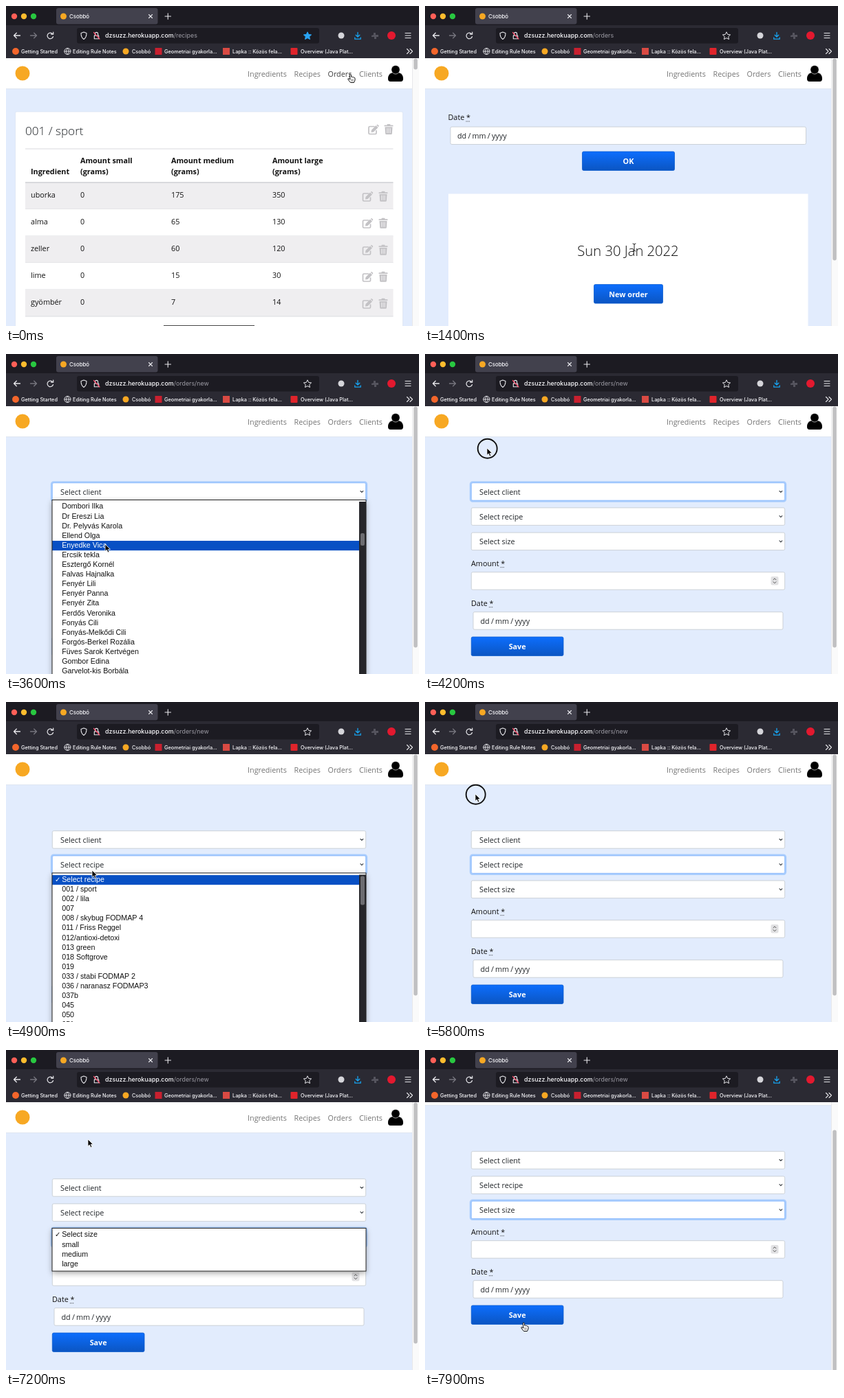
An HTML page that plays this animation: 600x466 px, repeating every 8 s.

```html
<!DOCTYPE html>
<html lang="hu">
<head>
<meta charset="utf-8">
<title>Orders</title>
<style>
  html, body { margin: 0; width: 100%; height: 100%; overflow: hidden; background: #e2ecfd; }
  svg { display: block; }
  #stage { width: 100vw; height: 100vh; }
  text { font-family: "Open Sans", sans-serif; white-space: pre; }
  .ui { font-family: Inter, sans-serif; font-weight: 500; }
  .list { font-family: "Liberation Sans", "DejaVu Sans", sans-serif; }
  .mid { text-anchor: middle; }
  .bold { font-weight: 700; }
  .light { font-weight: 300; }
</style>
</head>
<body>
<svg id="stage" viewBox="0 0 600 466" preserveAspectRatio="none">
  <defs>
    <linearGradient id="blue" x2="0" y2="1">
      <stop stop-color="#0d6efd"/><stop offset="1" stop-color="#0b55c2"/>
    </linearGradient>
    <filter id="shadow" x="-10%" y="-20%" width="120%" height="150%">
      <feDropShadow dx="0" dy="3" stdDeviation="4" flood-opacity=".35"/>
    </filter>
  </defs>
  <g id="page"></g>
  <g id="chrome"></g>
  <g id="over"></g>
</svg>
<script>
const LOOP = 8000, STEP = 100, ROW = 14.1;
const $ = id => document.getElementById(id);

// Drawing helpers, each returning SVG markup
const rect = (x, y, w, h, fill, more = '') =>
  `<rect x="${x}" y="${y}" width="${w}" height="${h}" fill="${fill}" ${more}/>`;
const text = (x, y, s, size = 10.8, fill = '#212529', cls = '') =>
  `<text x="${x}" y="${y}" font-size="${size}" fill="${fill}" class="${cls}">${s}</text>`;
const dot = (x, y, r, fill, more = '') =>
  `<circle cx="${x}" cy="${y}" r="${r}" fill="${fill}" ${more}/>`;
const line = (d, stroke, w = 1.1, more = '') =>
  `<path d="${d}" fill="none" stroke="${stroke}" stroke-width="${w}" stroke-linecap="round" stroke-linejoin="round" ${more}/>`;
const at = (x, y, s) => `<g transform="translate(${x} ${y})">${s}</g>`;

const pencil = (x, y) => at(x, y,
  line('M9 3H2.5Q1 3 1 4.5V12.5Q1 14 2.5 14H10.5Q12 14 12 12.5V9', '#c3c2c5', 1.7) +
  '<path d="M5 8L11.5 1.5L14.5 4.5L8 11L4.5 11.5ZM12.3 .8L13 .2Q13.7-.2 14.3 .4L15.5 1.6Q16 2.3 15.4 3L14.9 3.7Z" fill="#c3c2c5"/>');
const trash = (x, y) => at(x, y,
  rect(0, 1.5, 13, 1.8, '#c3c2c5', 'rx=".6"') + rect(4, 0, 5, 2, '#c3c2c5', 'rx=".8"') +
  '<path d="M1 4.3H12L11.3 14Q11.2 15 10 15H3Q1.8 15 1.7 14Z" fill="#c3c2c5"/>' +
  line('M4.2 6.3V12.7M6.5 6.3V12.7M8.8 6.3V12.7', '#f2f1f3', 1));

const field = (x, y, w, focus) =>
  (focus ? rect(x - 1.2, y - 1.2, w + 2.4, 27.9, 'none', 'rx="3" stroke="#a9cdfd" stroke-width="2.6"') : '') +
  rect(x, y, w, 25.5, '#fff', `rx="2" stroke="${focus ? '#86b7fe' : '#c8cdd3'}" stroke-width=".9"`);
const select = (y, label, focus) => field(67.3, y, 455.4, focus) +
  text(79, y + 17, label) + line(`M515 ${y + 11.8}l1.9 1.9l1.9-1.9`, '#343a40');
const button = (x, y, w, label) =>
  rect(x, y, w, 27.5, 'url(#blue)', 'rx="2" stroke="#0b5ccf" stroke-width=".8"') +
  text(x + w / 2, y + 18, label, 10.8, '#fff', 'bold mid');
const label = (x, y, s, star) => text(x, y, s + ' *', 10.8, '#111') +
  line(`M${star} ${y + 2}h6`, '#222', 1, 'stroke-dasharray=".1 2"');
const DATE = 'dd\u2009/\u2009mm\u2009/\u2009yyyy';

function header(hover) {
  const links = [[351, 'Ingredients'], [418.5, 'Recipes'], [467.5, 'Orders'], [513, 'Clients']];
  return rect(0, 76, 600, 44.5, '#fff') + rect(0, 120.3, 600, .8, '#dce3ee') +
    dot(24, 98, 10.5, '#f7a823') +
    links.map(([x, s]) => text(x, 102.7, s, 10.8, hover === s ? '#3c3c3c' : '#747474')).join('') +
    '<path d="M555 106Q555 98.5 561.5 97H570.5Q577 98.5 577 106Q577 110 573.5 110H558.5Q555 110 555 106Z"/>' +
    '<ellipse cx="566" cy="92.8" rx="6.2" ry="6.3" stroke="#fff" stroke-width=".6"/>';
}

const AMOUNTS = [['uborka', 175, 350], ['alma', 65, 130], ['zeller', 60, 120], ['lime', 15, 30], ['gyömbér', 7, 14]];
function recipesPage(t) {
  const cols = [36, 108, 240, 387];
  let s = header(t < 1000 ? 'Orders' : '') +
    rect(13.5, 154, 563, 330, '#fff', 'rx="2" stroke="#d9e2f1" stroke-width=".7"') +
    text(28, 188, '001 / sport', 17.1, '#212529', 'light') + pencil(526, 172.5) + trash(549.5, 172) +
    rect(28, 207.5, 534.5, 1, '#d9dade') + text(36, 244.7, 'Ingredient', 10.8, '#111', 'bold');
  ['small', 'medium', 'large'].forEach((size, i) => {
    s += text(cols[i + 1], 229.2, 'Amount ' + size, 10.8, '#111', 'bold') +
      text(cols[i + 1], 244.7, '(grams)', 10.8, '#111', 'bold');
  });
  AMOUNTS.forEach(([name, medium, large], i) => {
    const y = 257 + i * 39;
    s += rect(28, y, 534.5, 39, i % 2 ? '#fff' : '#efeef0') + rect(28, y + 38.5, 534.5, 1, '#dcdde1') +
      [name, 0, medium, large].map((v, k) => text(cols[k], y + 21.7, v, 10.8, '#111')).join('') +
      pencil(517.5, y + 13) + trash(541.5, y + 12.7);
  });
  return s + rect(28, 256.3, 534.5, 1.4, '#ccced2') + rect(229, 465, 132, 1, '#444');
}

function ordersPage() {
  return header() + label(33.5, 166, 'Date', 60) + field(37, 176, 516.5) + text(47, 192.5, DATE) +
    button(228.5, 212, 134, 'OK') + rect(34, 273.5, 522.5, 200, '#fff') +
    text(295, 364, 'Sun 30 Jan 2022', 20.2, '#111', 'light mid') +
    button(245.5, 405.5, 100, 'New order');
}

function formPage(t) {
  const focus = t < 2800 ? -1 : t < 4600 ? 0 : t < 6500 ? 1 : 2;
  return header() +
    ['client', 'recipe', 'size'].map((s, i) => select(187.7 + i * 36.2, 'Select ' + s, focus === i)).join('') +
    label(67, 308.7, 'Amount', 110) + field(67.3, 317.7, 455.4) +
    rect(502.5, 324, 11, 12.5, '#e1e1e3', 'rx="2"') +
    line('M506 328.8l2-2l2 2M506 331.8l2 2l2-2', '#555', 1) +
    label(67, 366.7, 'Date', 93.5) + field(70, 375.7, 450) + text(80.5, 392.5, DATE) +
    button(67.3, 412, 133.7, 'Save');
}

// Drop-down contents
const FAMILY = 'Abonka,Almosi,Bazsik,Berkő,Bodzás,Borsos,Csenger,Cserfás,Dalmos'.split(',');
const GIVEN = 'Anna,Cili,Emese,Lenke,Tekla'.split(',');
const CLIENTS = ['Select client',
  ...Array.from({ length: 43 }, (_, i) => FAMILY[Math.floor(i / 5)] + ' ' + GIVEN[i % 5]),
  ...('Dombori Ilka,Dr Ereszi Lia,Dr. Pelyvás Karola,Ellend Olga,Enyedke Vica,Ercsik tekla,Esztergő Kornél,' +
  'Falvas Hajnalka,Fenyér Lili,Fenyér Panna,Fenyér Zita,Ferdős Veronika,Fonyás Cili,Fonyás-Melkődi Cili,' +
  'Forgós-Berkel Rozália,Füves Sarok Kertvégen,Gombor Edina,Garvelot-kis Borbála').split(',')];
const RECIPES = ('Select recipe,001 / sport,002 / lila,007,008 / skybug FODMAP 4,011 / Friss Reggel,' +
  '012/antioxi-detoxi,013 green,018 Softgrove,019,033 / stabi FODMAP 2,036 / naranasz FODMAP3,037b,045,050,051').split(',');
const SIZES = ['Select size', 'small', 'medium', 'large'];

function list(items, top, height, pointerY, { scroll = 0, thumb, thumbY = 0, keep } = {}) {
  const wide = thumb ? 446 : 456;
  let hot = Math.floor((pointerY - top - 2.5 + scroll) / ROW);
  if (keep) hot = Math.max(0, hot);
  let s = '';
  items.forEach((name, i) => {
    const y = 9.5 + i * ROW - scroll;
    if (y < -10 || y > height + 10) return;
    const on = i === hot, ink = on ? '#fff' : '#111';
    if (on) s += rect(0, y - 6.4, wide, ROW, '#0850c4');
    if (!i) s += text(4, y + 3.4, '✓', 10, ink, 'list bold');
    s += text(14.2, y + 3.4, name, 10.7, ink, 'list');
  });
  if (thumb) s += rect(446, 2.5, 10, height, '#26262a') + rect(448, 4.5 + thumbY, 6, thumb, '#6c6c70', 'rx="2"');
  return rect(67, top, 456, height, '#fff', 'filter="url(#shadow)"') +
    `<svg x="67" y="${top}" width="456" height="${height}">${s}</svg>` +
    rect(67, top, 456, height, 'none', 'stroke="#222" stroke-width="1"');
}

function chrome(path, starred) {
  const star = 'M438 37.8l1.7 3.6l3.9.5l-2.9 2.7l.8 3.9l-3.5-1.9l-3.5 1.9l.8-3.9l-2.9-2.7l3.9-.5Z';
  const pale = '#e8e8ec', marks = [[22, 'Getting Started'], [97, 'Editing Rule Notes'], [183, 'Csobbó'],
    [230, 'Geometriai gyakorla...'], [329, 'Lapka :: Közös fela...'], [428, 'Overview (Java Plat...']];
  return rect(0, 0, 600, 28, '#1c1b22') + rect(0, 28, 600, 48, '#2b2a33') +
    rect(73, 3, 147.5, 23.5, '#42414d', 'rx="3"') +
    dot(12, 15, 4.2, '#ff5f57') + dot(26, 15, 4.2, '#febc2e') + dot(40, 15, 4.2, '#28c840') +
    dot(83.5, 15, 4.5, '#f7a823') + text(92, 18, 'Csobbó', 7.8, '#fbfbfe', 'ui') +
    line('M207.5 12.5l5 5m0-5l-5 5M231 15h8.5m-4.25-4.25v8.5', pale) +
    line('M20.5 43h-9m3.8-3.8l-3.8 3.8l3.8 3.8', pale, 1.3) +
    line('M35.5 43h9m-3.8-3.8l3.8 3.8l-3.8 3.8', '#77767f', 1.3) +
    line('M67.8 40.8A4.3 4.3 0 1 0 68.5 44.5M68.7 38v3.2h-3.2', pale, 1.2) +
    rect(103, 32, 352, 22.5, '#1c1b22', 'rx="3"') +
    line('M113 38l4 1.5Q117 46 113 48.5Q109 46 109 39.5Z', pale) +
    line('M129.4 42.5v-2a2.1 2.1 0 0 1 4.2 0v2M128.3 43h6.4v4.7h-6.4Z', pale) +
    line('M127.5 38.5l8.5 9.5', '#ff4f6e', 1.2) +
    `<text x="144" y="46.3" font-size="8.9" class="ui" fill="#fbfbfe">dzsuzz.herokuapp.com<tspan fill="#9c9ba4" font-weight="400">/${path}</tspan></text>` +
    `<path d="${star}" fill="${starred ? '#2aa5f5' : 'none'}" stroke="${starred ? '#2aa5f5' : pale}" stroke-linejoin="round"/>` +
    dot(487, 43, 4.5, '#d5d5da') +
    line('M511 38.5v6.5m-2.8-2.8l2.8 2.8l2.8-2.8M506.8 46v2.2h8.4V46', '#17a3f0', 1.3) +
    '<path d="M531 43l3-1v-3h3v3h4v3h-3v3h-3v-3h-4Z" fill="#55545e"/>' +
    dot(560, 43, 6, '#e3192f') + line('M580 39.5h8M580 43h8M580 46.5h8', pale) +
    dot(14, 66, 5, '#f3662b') +
    line('M94 66a4.6 4.6 0 1 1-9.2 0a4.6 4.6 0 1 1 9.2 0h-9.2M89.4 61.4q-4 4.6 0 9.2q4-4.6 0-9.2', pale, .9) +
    dot(174, 66, 4.5, '#f7a823') + rect(216.5, 61, 10, 10, '#c8202f') +
    rect(315, 61, 10, 10, '#d94a43') + rect(413.5, 61, 10, 10, '#e0242b', 'rx="1"') +
    marks.map(([x, s]) => text(x, 68.8, s, 7.3, '#fbfbfe', 'ui')).join('') +
    line('M582.5 62.5l3.5 3.5l-3.5 3.5M587 62.5l3.5 3.5l-3.5 3.5', pale);
}

function scrollbar(y, h) {
  return rect(590, 76, 10, 390, '#fafafa') + rect(590, 76, .8, 390, '#e4e4e6') +
    rect(592.3, y, 5.5, h, '#c0c0c2', 'rx="2.7"');
}

// Pointer: time, x, y
const PATH = [[0, 500, 99], [900, 500, 99], [1400, 304, 351], [1700, 295, 415], [2100, 295, 415],
  [2700, 150, 200], [3000, 146, 202], [3400, 144, 277], [3800, 144, 277], [4100, 90, 137], [4300, 90, 137],
  [4600, 125, 237], [4900, 125, 245], [5300, 122, 243], [5700, 73, 134], [5900, 73, 134],
  [6400, 119, 271], [6700, 119, 271], [7200, 119, 130], [7400, 119, 130], [7800, 143, 397], [LOOP, 143, 397]];
const CLICKS = [[200, 400], [1800, 2000], [2700, 2900], [4100, 4300], [4600, 4700], [5700, 5900], [6500, 6600], [7300, 7500]];
const within = (t, a, b) => t >= a && t < b;
const ease = p => p * p * (3 - 2 * p);
const ramp = (t, a, b) => ease(Math.min(1, Math.max(0, (t - a) / (b - a))));

function pointerAt(t) {
  const i = PATH.findIndex(k => k[0] > t), [a, x, y] = PATH[i - 1], [b, u, v] = PATH[i];
  const p = ramp(t, a, b);
  return [x + (u - x) * p, y + (v - y) * p];
}

function pointer(t, x, y) {
  const ring = CLICKS.some(c => within(t, ...c)) ? dot(x + .7, y + .8, 14, 'none', 'stroke="#111" stroke-width="1.9"') : '';
  let shape;
  if (within(t, 1200, 1600)) {
    shape = line('M-2-5Q0-5 0-3.5Q0-5 2-5M0-3.5V4.5M-2 6Q0 6 0 4.5Q0 6 2 6', '#222', 1);
  } else if (t < 1100 || within(t, 1600, 2200) || t >= 7700) {
    shape = '<path d="M-.8 1.2Q-.8 0 .2 0Q1.2 0 1.3 1.2L1.7 4.3Q3 3.6 3.6 4.7Q5 4 5.5 5.2Q7 5 7 6.5V9L5.5 12.5H.5L-3 8Q-3.6 6.5-2.3 6.5L0 8Z" fill="#fff" stroke="#111" stroke-linejoin="round"/>' +
      line('M2 7.5v3M4 7.5v3', '#444', .7);
  } else {
    shape = '<path d="M0 0V10.3L2.4 8.1L4 12L5.9 11.2L4.3 7.4H7.5Z" fill="#000" stroke="#fff" stroke-width=".8"/>';
  }
  return ring + at(x, y, shape);
}

function dropdown(t, y) {
  if (within(t, 2900, 4200)) {
    const p = ramp(t, 3000, 3500);
    return list(CLIENTS, 212.5, 270, y, { scroll: p * 44 * ROW, thumb: 18, thumbY: p * 44 });
  }
  if (within(t, 4700, 5700)) return list(RECIPES, 249, 240, y, { thumb: 42, keep: true });
  if (within(t, 6600, 7400)) return list(SIZES, 259.5, 62.5, y);
  return '';
}

function render(t) {
  const [x, y] = pointerAt(t), scroll = 40 * ramp(t, 7400, 7800);
  const [draw, path, thumb] = t < 1000 ? [recipesPage, 'recipes', 16]
    : t < 2200 ? [ordersPage, 'orders', 294] : [formPage, 'orders/new', 351];
  $('page').innerHTML = rect(0, 76, 600, 390, '#e2ecfd') + at(0, -scroll, draw(t)) + scrollbar(76.5 + scroll, thumb);
  $('chrome').innerHTML = chrome(path, t < 1000);
  $('over').innerHTML = dropdown(t, y) + pointer(t, x, y);
}

let shown = -1;
function tick() {
  const t = Math.floor(performance.now() % LOOP / STEP) * STEP;
  if (t !== shown) render(shown = t);
  requestAnimationFrame(tick);
}
tick();
</script>
</body>
</html>
```
